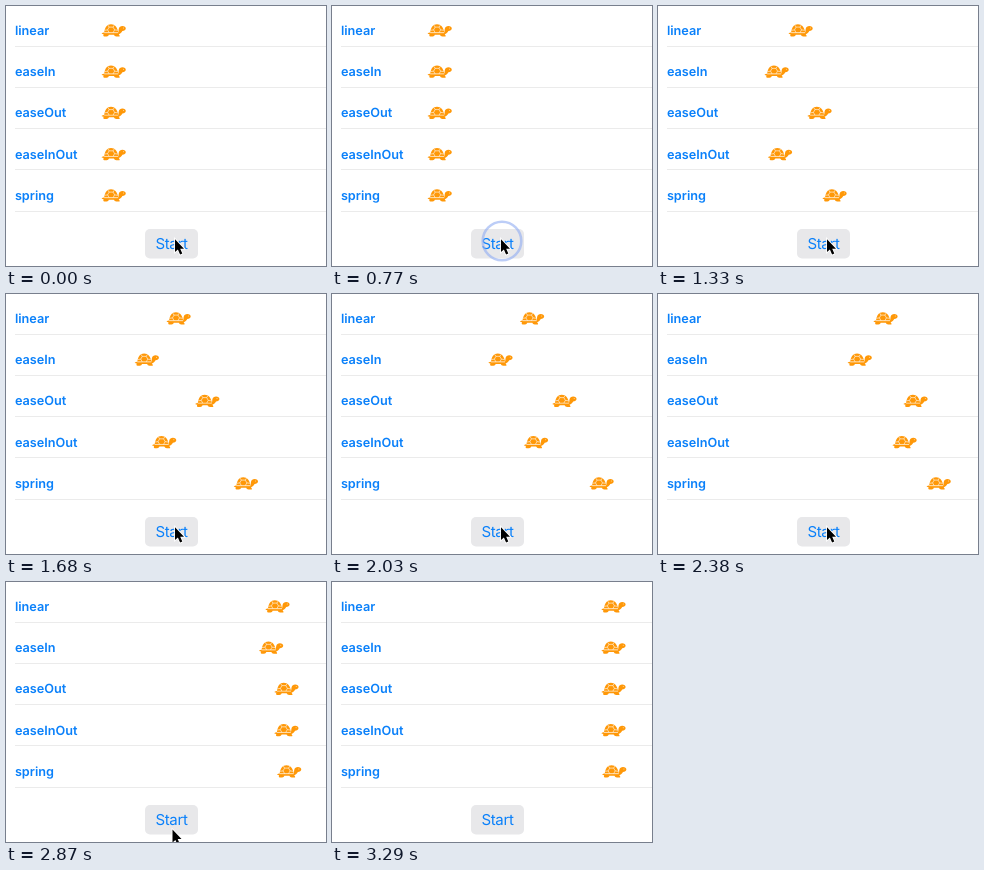
Animation, 320 px wide and 260 px high, one loop 3.36 s. Source, as an HTML page:

```html
<!DOCTYPE html>
<html lang="en">
<head>
<meta charset="utf-8">
<title>Timing curves</title>
<style>
  html, body { margin: 0; width: 100%; height: 100%; overflow: hidden; background: #fff; }
  svg { display: block; width: 320px; height: 260px; }
  text { font-family: Inter, "Liberation Sans", sans-serif; fill: #0a80fa; text-rendering: geometricPrecision; }
  .label { font-size: 12.7px; font-weight: 600; }
  .start { font-size: 15px; letter-spacing: -.32px; }
</style>
</head>
<body>
<svg viewBox="0 0 320 260">
  <defs>
    <g id="turtle">
      <g fill="#ff9808">
        <path d="M3 9C3.4 4.2 5.8.7 9.8.7S16.4 4.2 17 9Z"/>
        <path d="M16.7 9.4C17.6 8.4 17.2 6.8 17.6 5.3C18 3.3 19.4 2.5 21.2 2.5C23.3 2.5 24.6 3.5 24.6 5.1C24.5 6.8 23 7.5 21.2 7.5C20.2 9.4 18.8 10.5 16.7 10.8Z"/>
        <path d="M.3 10.1C1.2 9.2 2.2 8.8 3.2 8.9H17.3V10.7C16.4 11.2 15.4 11.3 14.4 11.3H5.4C3.4 11.3 1.6 10.8.3 10.1Z"/>
        <path d="M2.6 10.3L7.8 10.8C7.4 12.3 6.6 13 5.4 13H3.2C1.9 13 1.9 11.8 2.6 10.3Z"/>
        <path d="M12.6 10.8L17.4 10.2C17.8 11.2 18.5 11.9 18.5 12.4S18.1 13 17.4 13H15.2C13.9 13 13.1 12.3 12.6 10.8Z"/>
      </g>
      <path d="M7.9 3.6H11.9L13.4 6.4L11.9 9.1M7.9 9.1L6.4 6.4L7.9 3.6L6.7 1.6M11.9 3.6L13.1 1.6M6.4 6.4L3.4 6.8M13.4 6.4L16.5 6.8M3 9.2H17"
            fill="none" stroke="#fff" stroke-width=".6"/>
      <circle cx="22.2" cy="4.5" r=".45" fill="#fff"/>
    </g>
  </defs>
  <g id="rows"></g>
  <rect x="139" y="223" width="53" height="29.5" rx="5" fill="#e8e8ea"/>
  <text class="start" x="149.4" y="243.2">Start</text>
  <circle id="ring" cx="170" cy="235" fill="none" stroke="#93aef2" stroke-width="2.6"/>
  <path id="cursor" d="M0 0V12.9L2.9 10.3L5.1 15.4L7.3 14.4L5.2 9.5H9Z"
        fill="#000" stroke="#fff" stroke-width="1.7" paint-order="stroke"/>
</svg>
<script>
const LOOP = 3360, STEP = 70, START_X = 95.2, TRAVEL = 173.8, PITCH = 41.25;

const bezier = (x1, y1, x2, y2) => t => {
  if (t <= 0 || t >= 1) return t <= 0 ? 0 : 1;
  const at = (a, b, u) => 3 * a * u * (1 - u) ** 2 + 3 * b * u * u * (1 - u) + u ** 3;
  let lo = 0, hi = 1;
  for (let i = 0; i < 24; i++) {
    const mid = (lo + hi) / 2;
    if (at(x1, x2, mid) < t) lo = mid; else hi = mid;
  }
  return at(y1, y2, lo);
};

// Underdamped spring, two-second response
const spring = t => {
  const zeta = .825, s = t * 2 * Math.PI, root = Math.sqrt(1 - zeta * zeta), a = s * root;
  return 1 - Math.exp(-zeta * s) * (Math.cos(a) + zeta / root * Math.sin(a));
};

const curves = {
  linear: t => t,
  easeIn: bezier(.42, 0, 1, 1),
  easeOut: bezier(0, 0, .58, 1),
  easeInOut: bezier(.42, 0, .58, 1),
  spring
};

// Tables of [time, value, ...], linear between entries
const progress = [[928, 0], [1330, .201], [1680, .3735], [2380, .6895], [2870, .9425], [2985, 1], [3360, 1.19]];
const pointer = [[2730, 169, 233.2], [2800, 168.7, 236.5], [2870, 166.5, 247.6], [2940, 163, 264]];
const ripple = [[770, 19.3, .62], [840, 22, .5], [1120, 36, 0]];

function sample(table, t) {
  if (t <= table[0][0]) return table[0].slice(1);
  const i = table.findIndex(row => row[0] >= t);
  if (i < 0) return table[table.length - 1].slice(1);
  const a = table[i - 1], b = table[i], k = (t - a[0]) / (b[0] - a[0]);
  return a.slice(1).map((v, j) => v + (b[j + 1] - v) * k);
}

const $ = id => document.getElementById(id);
function add(tag, attrs, text = "") {
  const el = document.createElementNS("http://www.w3.org/2000/svg", tag);
  for (const name in attrs) el.setAttribute(name, attrs[name]);
  el.textContent = text;
  return $("rows").appendChild(el);
}

const runners = Object.entries(curves).map(([name, ease], i) => {
  add("text", { class: "label", x: 8.9, y: 28.8 + PITCH * i }, name);
  add("rect", { x: 9, y: Math.floor(40.2 + PITCH * i), width: 311, height: 1, fill: "#ebebeb" });
  return { ease, y: 17.5 + PITCH * i, el: add("use", { href: "#turtle" }) };
});

function draw(time) {
  const t = Math.floor(time % LOOP / STEP) * STEP;
  const [p] = sample(progress, t);
  for (const { ease, y, el } of runners) {
    const k = ease === spring ? spring(p) : ease(Math.min(p, 1));
    el.setAttribute("transform", `translate(${START_X + TRAVEL * k} ${y})`);
  }
  const [r, alpha] = sample(ripple, t);
  $("ring").setAttribute("r", r);
  $("ring").setAttribute("opacity", t < 770 ? 0 : alpha);
  $("cursor").setAttribute("transform", `translate(${sample(pointer, t).join(" ")})`);
}

const begin = performance.now();
function tick() {
  draw(performance.now() - begin);
  requestAnimationFrame(tick);
}
tick();
</script>
</body>
</html>
```
